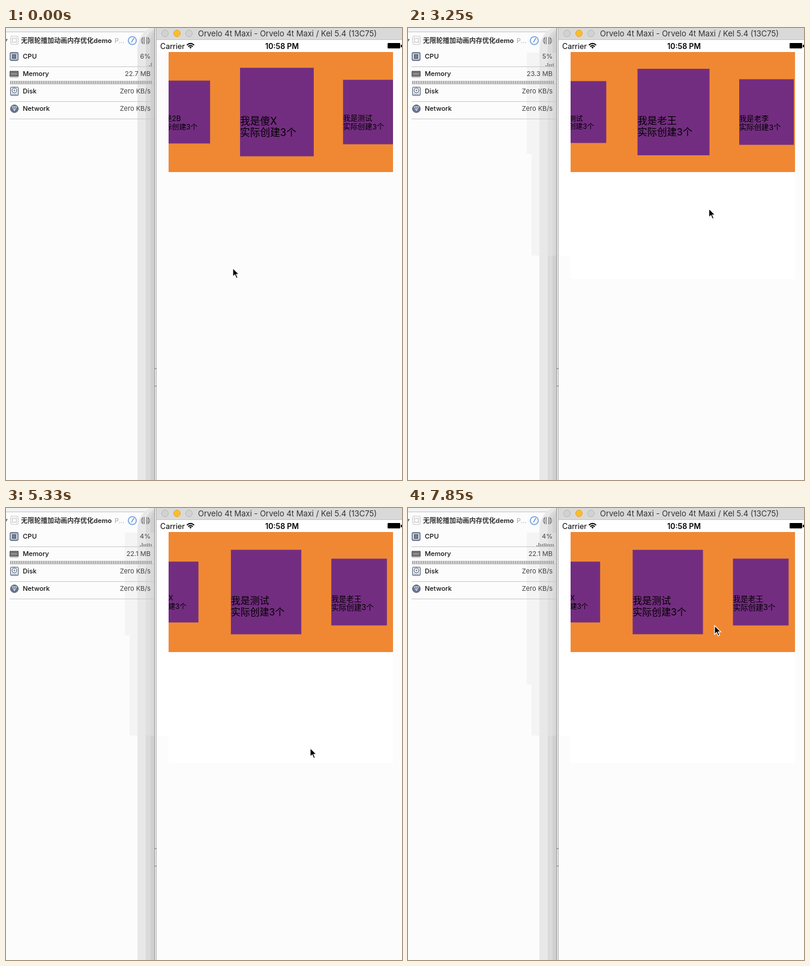
Animation, 660 px wide and 753 px high, one loop 8000 ms. Source, as an HTML page:

```html
<!DOCTYPE html>
<html lang="zh">
<head>
<meta charset="utf-8">
<title>Carousel memory demo</title>
<style>
  html, body { margin: 0; width: 100%; height: 100%; overflow: hidden; background: #fcfcfc; }
  svg { display: block; width: 660px; height: 753px; }
  text { font-family: Inter, "Noto Sans CJK SC", "Noto Sans CJK", sans-serif; white-space: pre; }
  .row { font-size: 11px; font-weight: 500; fill: #111; }
  .val { font-size: 11px; fill: #444; text-anchor: end; }
  .card text { font-size: 17px; fill: #000; }
</style>
</head>
<body>
<svg viewBox="0 0 660 753" xmlns="http://www.w3.org/2000/svg">
  <defs>
    <clipPath id="stage"><rect x="271" y="40" width="374" height="200"/></clipPath>
    <clipPath id="side"><rect width="247" height="753"/></clipPath>
  </defs>
  <rect width="660" height="753" fill="#fcfcfc"/>

  <!-- debug navigator -->
  <rect width="248" height="6" fill="#f3f3f3"/>
  <path d="M0 6.5H248" stroke="#c4c4c4"/>
  <g clip-path="url(#side)">
    <rect x="219" y="-4" width="90" height="800" rx="38" fill="#e8e8e8"/>
    <rect x="233" y="0" width="70" height="800" rx="24" fill="#dadada"/>
    <rect x="241" y="4" width="60" height="800" rx="14" fill="#d0d0d0"/>
    <rect id="ghostA" x="198" y="41" width="49" fill="#e6e6e6" opacity=".4"/>
    <rect id="ghostB" x="206" width="41" fill="#e6e6e6" opacity=".4"/>
  </g>
  <path d="M0 18.5H3L0 23Z" fill="#666"/>
  <g fill="none" stroke="#b9b9b9">
    <rect x="7.5" y="13.5" width="13" height="14" rx="2" stroke-dasharray="2 1"/>
    <circle cx="14" cy="20.5" r="3.5"/>
    <path d="M10 14V27M18 14V27M8 17H20M8 24H20" stroke="#dedede"/>
  </g>
  <text x="25" y="25" font-size="11" font-weight="700" fill="#333">无限轮播加动画内存优化demo</text>
  <text x="181" y="25" font-size="11" fill="#aaa">P...</text>
  <circle cx="210.5" cy="21" r="6.7" fill="#f5faff" stroke="#7aa9e8" stroke-width="1.8"/>
  <path d="M209 24L213 17" stroke="#5f83b5" stroke-width="1.3"/>
  <path d="M230.500 15V27M234.500 15V27M228 16Q223 21 228 26ZM237 16Q242 21 237 26Z" fill="none" stroke="#777" stroke-width="1.1"/>
  <path d="M6 64.500H247M6 93.500H247M6 122.500H247M6 151.500H247" stroke="#c8c8c8"/>

  <g fill="none" stroke="#505e74">
    <rect x="7" y="41" width="13" height="13" rx="2" fill="#d8dee8" stroke-width="1.4"/>
    <rect x="10.500" y="44.500" width="6" height="6" fill="#73829a"/>
    <path d="M9 43H18M9 52H18" stroke-dasharray="1 1"/>
    <rect x="6.500" y="72.500" width="14" height="8" fill="#777" stroke="#555"/>
    <path d="M7 82.500H21M7 71.500H21" stroke="#666" stroke-dasharray="1 1"/>
    <path d="M9 76.500H18" stroke="#aaa"/>
    <rect x="7.500" y="98.500" width="13" height="14" rx="1.500" fill="#e5e9ee"/>
    <circle cx="14" cy="104" r="4" fill="#fff"/>
    <circle cx="14" cy="104" r="1"/>
    <path d="M9 110.500H19" stroke-dasharray="2 1"/>
    <circle cx="14" cy="134.500" r="6.500" fill="#65758e"/>
    <path d="M10 131L18 131L14 138ZM14 138V131" stroke="#dce3ee"/>
  </g>
  <g class="row">
    <text x="28" y="51">CPU</text><text x="28" y="80">Memory</text>
    <text x="28" y="109">Disk</text><text x="28" y="138">Network</text>
  </g>
  <g class="val">
    <text id="cpu" x="241" y="51"/><text id="mem" x="241" y="80"/>
    <text x="241" y="109">Zero KB/s</text><text x="241" y="138">Zero KB/s</text>
  </g>
  <path id="cpuBars" stroke="#999" stroke-width="2"/>
  <path d="M7 90.500H243" stroke="#a4a4a4" stroke-width="5" stroke-dasharray="2 1"/>

  <!-- simulator window -->
  <rect x="247" width="4" height="753" fill="#e4e4e4"/>
  <path d="M247.500 0V753" stroke="#999"/>
  <path d="M250.500 0V753" stroke="#b5b5b5"/>
  <path d="M248 567.500H251M248 596.500H251" stroke="#777"/>
  <rect x="251" width="409" height="20" fill="#d9d9d9"/>
  <path d="M251 19.500H660" stroke="#c6c6c6"/>
  <g fill="#d2d2d2" stroke="#b8b8b8">
    <circle cx="265" cy="9" r="5.500"/><circle cx="305" cy="9" r="5.500"/>
    <circle cx="285" cy="9" r="5.500" fill="#fbbd2e" stroke="#e0a52b"/>
  </g>
  <text x="320" y="14" font-size="13" fill="#333">Orvelo 4t Maxi - Orvelo 4t Maxi / Kel 5.4 (13C75)</text>
  <rect x="251" y="20" width="409" height="20" fill="#fff"/>
  <text x="257" y="35" font-size="12.500">Carrier</text>
  <g fill="none" stroke="#000" stroke-width="1.700">
    <path d="M301.500 28.500Q307.500 23 313.500 28.500M303.700 31Q307.500 27.500 311.300 31"/>
    <path d="M305.500 32L307.500 34.500L309.500 32Q307.500 30.500 305.500 32Z" fill="#000" stroke="none"/>
  </g>
  <text x="460" y="35" font-size="12.500" font-weight="600" text-anchor="middle">10:58 PM</text>
  <rect x="636" y="25" width="21" height="9" rx="1"/>
  <rect x="658" y="28" width="2" height="4"/>

  <rect id="paleA" x="251" y="40" width="20" fill="#fff"/>
  <rect id="paleB" x="271" y="240" width="374" fill="#fff"/>
  <g clip-path="url(#stage)">
    <rect x="271" y="40" width="374" height="200" fill="#f08833"/>
    <g id="cards"></g>
  </g>
  <path id="cursor" d="M0 0V14.500L3.400 11.300L5.900 17L8.300 16L5.900 10.400H10.400Z" fill="#000" stroke="#fff" stroke-width="1.200"/>
</svg>
<script>
const $ = id => document.getElementById(id);
const LOOP = 8000, STEP = 148.3, PITCH = 155, VIEW = 374, MID = 458;
const NAMES = ['2B', '傻X', '测试', '老王', '老李', '小王'];

// step, scroll offset, cursor x, cursor y
const KEYS = [
  [0, 161.5, 378, 400], [7, 297, 378, 400], [16, 319, 462, 197], [28, 642, 541, 405],
  [36, 334.5, 507, 400], [43, 656.5, 462, 275], [53, 335, 511, 196]
];
// one reading per second: CPU %, memory MB
const READINGS = [
  [6, 22.7], [4, 22.1], [4, 23.3], [5, 23.3], [5, 22.1], [4, 22.1], [4, 23.3], [4, 23.3], [4, 22.1]
];
// step, bottom of upper patch, bottom of lower patch, bottom of pale page
const PATCHES = [
  [0, 41, 41, 240], [1, 207, 207, 240], [8, 210, 379, 418],
  [24, 212, 379, 425], [37, 287, 379, 425], [44, 294, 379, 425]
];

$('cards').innerHTML = NAMES.map(name => `<g class="card">
  <rect x="-62.5" y="-75" width="125" height="150" fill="#732d80"/>
  <text x="-62.5" y="21.3">我是${name}</text>
  <text x="-62.5" y="41.1">实际创建3个</text></g>`).join('');
const cards = [...$('cards').children];

function poseAt(step) {
  let i = 0;
  while (i < KEYS.length - 2 && step >= KEYS[i + 1][0]) i++;
  const a = KEYS[i], b = KEYS[i + 1];
  const u = Math.min(1, (step - a[0]) / (b[0] - a[0]));
  const e = u * u * (3 - 2 * u);
  return a.map((v, k) => v + (b[k] - v) * e);
}

function setHeight(id, top, bottom) {
  $(id).setAttribute('height', Math.max(0, bottom - top));
}

function draw(t) {
  const step = Math.min(53, Math.floor((t + 15) / STEP));
  const [, scroll, cx, cy] = poseAt(step);

  cards.forEach((card, i) => {
    const d = i * PITCH - scroll;
    const scale = 1 / (1 + Math.abs(d) / VIEW);
    card.setAttribute('transform', `translate(${MID + d} 140) scale(${scale})`);
  });
  $('cursor').setAttribute('transform', `translate(${cx} ${cy})`);

  const tick = Math.floor(t / 1000 + 0.2);
  const [cpu, mem] = READINGS[tick];
  $('cpu').textContent = cpu + '%';
  $('mem').textContent = mem + ' MB';
  let bars = '';
  for (let k = 0; k < tick + 2; k++) {
    const h = k ? READINGS[k - 1][0] : 2;
    bars += `M${242 - 3 * (tick + 1 - k)} 64v${-h}`;
  }
  $('cpuBars').setAttribute('d', bars);

  const [, upper, lower, page] = PATCHES.filter(p => p[0] <= step).pop();
  setHeight('ghostA', 41, upper);
  $('ghostB').setAttribute('y', upper);
  setHeight('ghostB', upper, lower);
  setHeight('paleA', 40, lower);
  setHeight('paleB', 240, page);
}

const start = performance.now();
function frame() {
  draw((performance.now() - start) % LOOP);
  requestAnimationFrame(frame);
}
frame();
</script>
</body>
</html>
```
